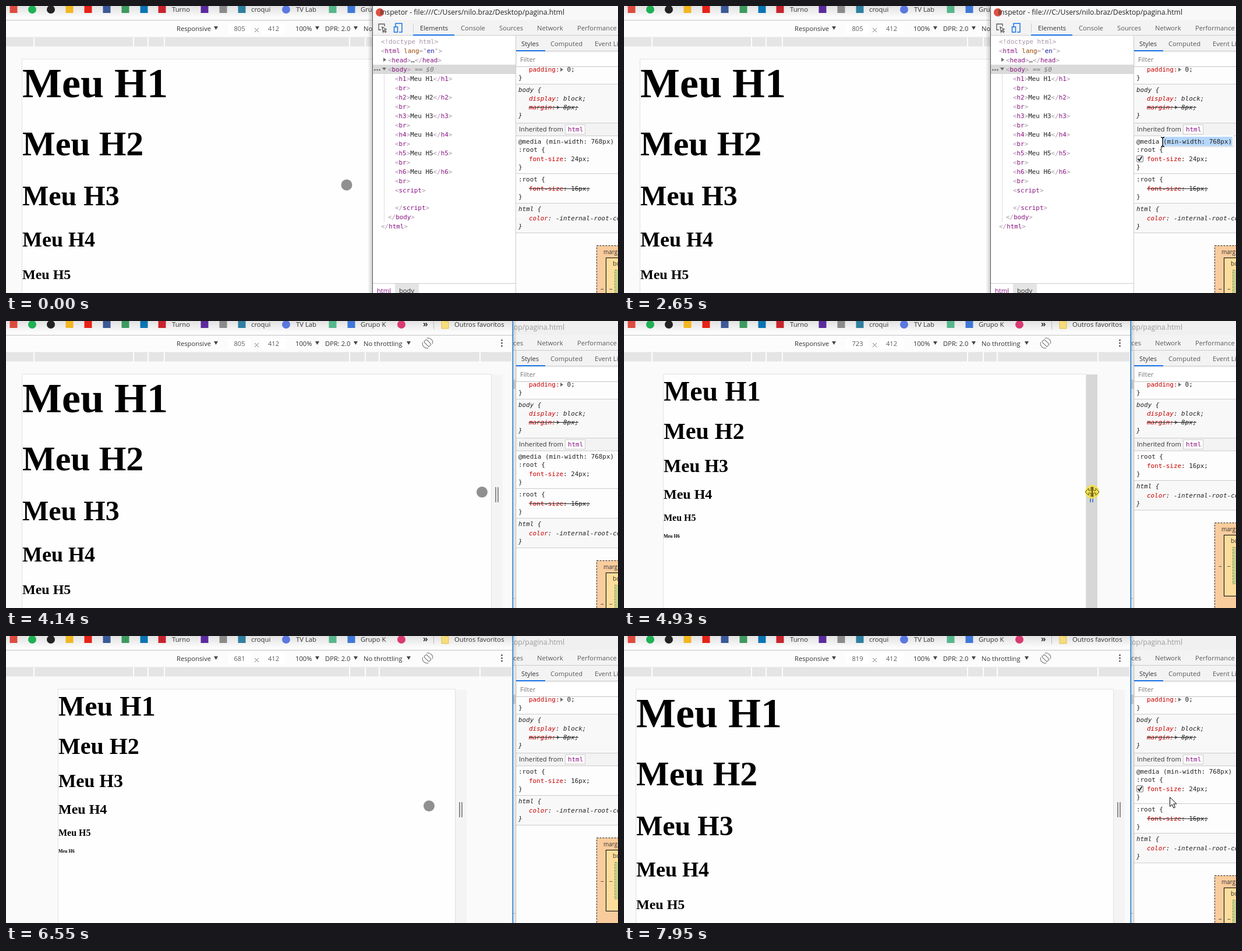
Recreate the animation shown at these times as an HTML page. Size 1051x494 px, loop 8 s.

```html
<!DOCTYPE html>
<html lang="pt">
<head>
<meta charset="utf-8">
<style>
html, body { margin: 0; width: 100%; height: 100%; overflow: hidden; background: #fff; }
svg { display: block; width: 100%; height: 100%; }
text { font: 11.2px "Open Sans", sans-serif; fill: #333; white-space: pre; }
.code { font: 10.9px "DejaVu Sans Mono", monospace; fill: #222; }
.head { font-family: "Liberation Serif", serif; font-weight: bold; fill: #000; }
.it { font-style: italic; }
.soft { fill: #5a5a5a; }
.tag { fill: #881280; }
.br { fill: #a894a6; }
.prop { fill: #c80000; }
</style>
</head>
<body>
<svg id="stage" viewBox="0 0 1051 494" xmlns="http://www.w3.org/2000/svg"></svg>
<script>
const LOOP = 8000;
const stage = document.getElementById('stage');
const $ = id => document.getElementById(id);

// ---- markup helpers ----
const rect = (x, y, w, h, fill, more = '') =>
  `<rect x="${x}" y="${y}" width="${w}" height="${h}" fill="${fill}" ${more}/>`;
const text = (x, y, s, cls = '', more = '') =>
  `<text x="${x}" y="${y}" class="${cls}" ${more}>${s}</text>`;
const code = (x, y, s, cls = '') => text(x, y, s, 'code ' + cls);
const span = (cls, s) => `<tspan class="${cls}">${s}</tspan>`;
const tag = (name, extra = '') =>
  span('br', '&lt;' + (name[0] === '/' ? '/' : '')) + span('tag', name.replace('/', '')) + extra + span('br', '&gt;');
const prop = (name, value) => span('prop', name) + ': ' + value + ';';
const path = (d, fill, more = '') => `<path d="${d}" fill="${fill}" ${more}/>`;
const down = (x, y) => path(`M${x} ${y}h7l-3.5 6z`, '#444');
const right = (x, y) => path(`M${x} ${y}v7l5 -3.5z`, '#6e6e6e');
const hline = (x, y, w, fill = '#ccc') => rect(x, y, w, 1, fill);
const group = (id, s) => `<g id="${id}">${s}</g>`;

// ---- browser window ----
function browser() {
  const marks = [
    [13, '#dd4b3e', 0], [45, '#1fb055', 1], [77, '#222', 1], [109, '#f2b61f', 0], [141, '#e62117', 0],
    [173, '#3b5998', 0], [205, '#3c9a5f', 0], [237, '#0a74b3', 0], [268, '#c8232c', 0], [341, '#5b2a9d', 0],
    [373, '#8a8a8a', 0], [405, '#2f7f9f', 0], [481, '#5b78e0', 1], [561, '#56b68b', 0], [593, '#3f78d8', 0],
    [679, '#d93a72', 1]
  ];
  const icons = marks.map(([x, c, round]) => round
    ? `<circle cx="${x}" cy="6" r="7" fill="${c}"/>`
    : rect(x - 6.5, -1, 13, 13, c)).join('');
  const names = [[285, 'Turno'], [421, 'croqui'], [498, 'TV Lab'], [609, 'Grupo K'], [770, 'Outros favoritos']]
    .map(([x, s]) => text(x, 10, s, '', 'style="font-size:11.3px"')).join('');
  const gaps = [47, 218, 243, 271, 589, 616, 640, 813].map(x => rect(x, 54, 2, 16, '#fdfdfd')).join('');
  return rect(870, 0, 8, 494, 'url(#cast)') +
    rect(0, 0, 870, 494, '#fafafa') + rect(0, 0, 870, 24, 'url(#bar)') + icons + names +
    text(716, 10, '»', '', 'style="font-size:14px;font-weight:bold"') + rect(734, 0, 1, 14, '#bbb') +
    path('M748 -1h5l1 2h6v12h-12z', '#f7dc7a', 'stroke="#e0bd50"') +
    hline(0, 24, 870, '#c4c4c4') + rect(0, 25, 870, 28, '#fcfcfc') +
    rect(381, 30, 40, 18, '#fff') + rect(439, 30, 41, 18, '#fff') +
    text(293, 43, 'Responsive') + down(357, 35) +
    text(401, 43, '805', 'soft', 'id="size" text-anchor="middle"') +
    path('M427 38l7 7m0 -7l-7 7', 'none', 'stroke="#777"') + text(459.5, 43, '412', 'soft', 'text-anchor="middle"') +
    text(497, 43, '100%') + down(531, 35) + text(548, 43, 'DPR: 2.0') + down(597, 35) +
    text(614, 43, 'No throttling') + down(688, 35) +
    `<g fill="none" stroke="#6e6e6e" transform="rotate(45 724 38)"><rect x="718" y="35" width="12" height="6" rx="1"/><path d="M717 33a8 8 0 0 1 14 0M731 43a8 8 0 0 1 -14 0"/></g>` +
    [33, 38, 43].map(y => `<circle cx="851.5" cy="${y}" r="1.5" fill="#5a5a5a"/>`).join('') +
    hline(0, 53, 870, '#eee') + rect(0, 54, 868, 15.5, '#e5e5e5') + gaps +
    group('page', rect(0, 92, 0, 402, '#fefefe', 'id="sheet" stroke="#e2e2e2"') +
      [1, 2, 3, 4, 5, 6].map(n => text(0, 0, 'Meu H' + n, 'head', `id="h${n}"`)).join('')) +
    group('handle', rect(1, 92, 19, 402, '#000', 'id="grip"') +
      group('bars', rect(7, 286, 2, 26, 'currentColor') + rect(11, 286, 2, 26, 'currentColor'))) +
    rect(869.5, 0, 1.5, 494, '#1a7fd4');
}

// ---- inspector window ----
function tree() {
  const rows = [[644, span('br', '&lt;!doctype html&gt;')],
    [644, tag('html', ' <tspan fill="#994500">lang</tspan>' + span('br', '="') + '<tspan fill="#1a1aa6">en</tspan>' + span('br', '"'))],
    [656, tag('head') + '…' + tag('/head')],
    [656, tag('body') + '<tspan class="it" fill="#777"> == $0</tspan>']];
  for (let n = 1; n < 7; n++)
    rows.push([668, tag('h' + n) + 'Meu H' + n + tag('/h' + n)], [668, tag('br')]);
  rows.push([668, tag('script')]);
  const tail = [[668, '/script'], [656, '/body'], [644, '/html']];
  return rect(630, 101, 245, 16, '#dadada') + rect(649, 117, 1, 255, '#ddd') +
    rows.map(([x, s], i) => code(x, 65 + 16 * i, s)).join('') +
    tail.map(([x, s], i) => code(x, 351 + 16 * i, tag(s))).join('') +
    right(648, 89) + path('M646 106h7l-3.5 5z', '#6e6e6e') +
    [634, 638, 642].map(x => `<circle cx="${x - 0.5}" cy="110" r="1.2" fill="#555"/>`).join('');
}

function struck(y, s) {
  return code(898, y, s) + rect(898, y - 4, 105, 1, '#222');
}

function boxModel() {
  const dash = 'stroke="#222" stroke-dasharray="3 2"';
  return rect(1014.5, 412.5, 60, 148, '#f9cc9d', dash) + rect(1030.5, 433.5, 60, 105, '#fddd9b', 'stroke="#000"') +
    rect(1045.5, 454.5, 60, 63, '#c3d08b', 'stroke="#8a8a5a" stroke-dasharray="3 2"') +
    text(1026, 427, 'margin', '', 'style="font-size:10px"') + text(1042, 447, 'border', '', 'style="font-size:10px"') +
    text(1021, 490, '–') + text(1036, 490, '–');
}

function inspector() {
  const tabs = [[711, 'Elements'], [781, 'Console'], [847, 'Sources'], [912, 'Network'], [981, 'Performance']]
    .map(([x, s], i) => text(x, 42, s, i ? 'soft' : '')).join('');
  const rules =
    code(898, 113, span('prop', 'padding:') + '  0;') + right(952, 106) + code(880, 127, '}') + hline(876, 134, 175) +
    rect(876, 135, 175, 66, '#f8f8f8') + code(880, 148, 'body {', 'it') +
    code(898, 163, prop('display', 'block'), 'it') +
    code(898, 178, span('prop', 'margin:') + '  8px;', 'it') + right(946, 171) + rect(898, 174, 85, 1, '#222') +
    code(880, 192, '}', 'it') + hline(876, 201, 175) + rect(876, 202, 175, 21, '#f3f3f3') + hline(876, 223, 175) +
    text(881, 216, 'Inherited from') + rect(960.5, 204.5, 34, 16, '#fff', 'stroke="#ccc"') + code(965, 216, 'html', 'tag');
  const wide = code(880, 237, '@media ') + 
    group('edit', rect(924, 223, 124, 20, '#000', 'opacity=".12"') + rect(923, 223, 124, 18.5, '#fff') + rect(925, 225, 120, 16, '#b5d7fb')) +
    code(926, 237, '(min-width: 768px)') + code(880, 251, ':root {') +
    code(898, 267, prop('font-size', '24px')) + code(880, 281, '}') + hline(876, 288, 175) +
    code(880, 302, ':root {') + struck(318, prop('font-size', '16px')) + code(880, 332, '}') + hline(876, 339, 175);
  const narrow = code(880, 237, ':root {') + code(898, 253, prop('font-size', '16px')) + code(880, 267, '}') + hline(876, 274, 175);
  const lower = rect(876, 340, 175, 50, '#f8f8f8') + code(880, 353, 'html {', 'it') +
    code(898, 369, prop('color', '-internal-root-color'), 'it') + code(880, 383, '}', 'it') + hline(876, 390, 175) + boxModel();
  return rect(621, 0, 8, 494, 'url(#castLeft)') + rect(629, 0, 422, 494, '#fff') +
    rect(629, 0, 422, 24, '#f8f8f8', 'id="title"') +
    '<circle cx="642" cy="11" r="7" fill="#dd5144"/>' +
    text(959, 15, 'Inspetor - file:///C:/Users/nilo.braz/Desktop/pagina.html', '', 'id="caption" text-anchor="end" style="font-size:12.2px"') +
    rect(629, 24, 422, 27, '#f3f3f3') + hline(629, 50, 422) +
    path('M650 35v-4h-10v10h4M646 36l7 4l-3 1l3 3l-1.5 1.5l-3 -3l-1 2.5z', 'none', 'stroke="#5a5a5a" stroke-width="1.3"') +
    path('M669 36v-6h11v15h-5M666.500 36h6v9h-6z', 'none', 'stroke="#1a73e8" stroke-width="1.5"') +
    rect(699, 30, 1, 16, '#ccc') + tabs + rect(699, 49, 71, 2, '#1a73e8') + tree() +
    rect(630, 478, 245, 16, '#fff') + hline(630, 477, 245) + rect(668, 478, 41, 16, '#e4e4e4') +
    text(637, 494, 'html', 'tag') + text(675, 494, 'body') +
    rect(875, 51, 1, 443, '#ccc') + rect(876, 51, 175, 27, '#f3f3f3') + hline(876, 77, 175) +
    text(885, 69, 'Styles') + text(935, 69, 'Computed', 'soft') + text(1011, 69, 'Event Listeners', 'soft') +
    rect(876, 76, 50, 2, '#1a73e8') + rect(876, 78, 175, 26, '#f3f3f3') + rect(878, 80, 173, 23, '#fff') +
    text(883, 96, 'Filter', '', 'style="fill:#757575"') + hline(876, 104, 175) + rect(876, 105, 175, 389, '#fdfdfd') + rules +
    group('wide', wide) + group('narrow', narrow) + group('lower', lower) +
    group('check', rect(880.5, 257.5, 11, 11, '#eee', 'rx="1.500" stroke="#8a8a8a"') +
      path('M882.500 263l2.500 3l4.500 -7', 'none', 'stroke="#333" stroke-width="2"')) +
    rect(629, 0, 1, 494, '#555');
}

stage.innerHTML = `<defs>
  <linearGradient id="bar" x2="0" y2="1"><stop stop-color="#e2e2e2"/><stop offset=".8" stop-color="#fbfbfb"/></linearGradient>
  <linearGradient id="cast"><stop stop-opacity=".18"/><stop offset="1" stop-opacity="0"/></linearGradient>
  <linearGradient id="castLeft"><stop stop-opacity="0"/><stop offset="1" stop-opacity=".18"/></linearGradient></defs>` +
  group('dev', inspector()) + group('web', browser()) + group('cursor',
    '<circle id="press" r="12" fill="#f4e04d" opacity=".9"/>' +
    '<circle id="dot" r="9.500" fill="#909090"/>' +
    path('M0 0v16l3.800 -3.500l2.500 6l2.600 -1.100l-2.500 -5.900h5z', '#fff', 'id="arrow" stroke="#000"') +
    path('M-3 -8q3 0 3 2q0 -2 3 -2M0 -6v12M-3 8q3 0 3 -2q0 2 3 2', 'none', 'id="beam" stroke="#000" stroke-width="1.300"') +
    path('M-12 0l6 -6v4h4v-6h1.500v16h-1.500v-6h-4v4zM12 0l-6 -6v4h-4v-6h-1.500v16h1.500v-6h4v4z', '#f4e04d', 'id="resize" stroke="#4a4310" stroke-width=".9"'));

// ---- timeline ----
const bursts = [[70, 300, 4], [530, 1310, 11], [1400, 2020, 9], [2190, 2970, 11], [3050, 3500, 7], [3670, 4290, 9],
  [4460, 5240, 11], [5320, 6090, 11], [6170, 6400, 4], [6550, 6850, 5], [7020, 7020, 1], [7170, 7950, 11]];
const trail = [[0, 585, 308], [147, 546, 322], [500, 546, 322], [530, 535, 320], [608, 414, 257], [686, 320, 226],
  [764, 191, 185], [842, 283, 188], [920, 302, 140], [998, 340, 127], [1076, 410, 153], [1232, 655, 207],
  [1310, 746, 236.500], [1600, 880, 246], [2020, 1019, 238], [2190, 1019, 238], [2658, 925, 234], [2970, 889, 262],
  [3050, 855, 266], [3500, 585, 286], [3670, 554, 288], [3750, 554, 288], [4135, 817.500, 294.500], [4290, 843, 298],
  [4460, 845, 298], [4928, 804, 294], [5320, 783, 298], [5475, 781, 298], [6090, 971, 254], [6400, 708, 284],
  [6550, 726.500, 292.500], [6850, 781, 300], [7170, 781, 301], [7560, 850, 300], [7638, 850, 298], [7950, 937.500, 277.500]];
const widths = [[0, 805], [4460, 805], [4928, 723], [5240, 686], [5320, 681], [7170, 681], [7560, 819]];
const drags = [[4460, 5395], [7020, 7635]];
const presses = [[147, 300], [2190, 2340], [3670, 3820], ...drags];
const within = (t, list) => list.some(([a, b]) => t >= a && t < b);

function stepTime(t) {
  let q = 0;
  for (const [a, b, n] of bursts) {
    if (t < a) break;
    const d = (b - a) / (n - 1) || 1;
    q = a + Math.min(n - 1, Math.floor((t - a) / d + 0.12)) * d;
  }
  return q;
}

function at(keys, t, col) {
  const i = keys.findIndex(k => k[0] > t);
  if (i < 0) return keys[keys.length - 1][col];
  if (!i) return keys[0][col];
  const a = keys[i - 1], b = keys[i];
  return a[col] + (b[col] - a[col]) * (t - a[0]) / (b[0] - a[0]);
}

const show = (id, on) => $(id).style.display = on ? '' : 'none';
const move = (id, x, y) => $(id).setAttribute('transform', `translate(${x} ${y})`);
const set = (id, attrs) => { for (const k in attrs) $(id).setAttribute(k, attrs[k]); };

const sizes = [48, 40, 32, 24, 16, 8];
const bases = { big: [157, 257, 343, 414, 470, 517], small: [137, 202.5, 259.5, 306, 344, 373] };
let front = 'web';

function draw(t) {
  const q = stepTime(t);
  const x = at(trail, q, 1), y = at(trail, q, 2);
  const w = Math.round(at(widths, q - 12, 1));
  const left = Math.floor(430.5 - w / 2), edge = left + w;
  const big = w >= 768, drag = within(q, drags);

  const next = (q >= 225 && q < 2260) || q >= 3740 ? 'web' : 'dev';
  if (next !== front) stage.insertBefore($(front = next), $('cursor'));
  const active = front === 'dev';
  set('title', { fill: active ? '#f8f8f8' : '#f0f0f0' });
  $('caption').style.fill = active ? '#222' : '#999';

  $('size').textContent = Math.round(at(widths, q, 1));
  move('page', left, 0);
  set('sheet', { x: -0.5, y: 91.5, width: w + 1, height: 410 });
  sizes.forEach((s, i) => {
    const h = $('h' + (i + 1));
    h.style.fontSize = s * (big ? 1.5 : 1) + 'px';
    h.setAttribute('y', bases[big ? 'big' : 'small'][i]);
  });

  const grip = !active && (drag || (x >= edge && x < edge + 21));
  move('handle', edge, 0);
  set('grip', { 'fill-opacity': drag ? 0.14 : grip ? 0.08 : 0.025 });
  $('bars').style.color = drag ? '#4a86c8' : '#8c8c8c';

  show('wide', big);
  show('narrow', !big);
  show('edit', q >= 2340 && q < 3740);
  move('lower', 0, big ? 0 : -65);
  show('check', !drag && x > 876 && y > 223 && y < (big ? 288 : 274));
  move('check', 0, big ? 0 : -14);

  const overPage = x < (active ? 629 : edge) && !drag;
  const beam = active && q >= 2340 && x > 920 && y < 243;
  move('cursor', x, y);
  show('press', within(q, presses));
  show('dot', overPage);
  show('resize', grip);
  show('beam', beam);
  show('arrow', !overPage && !grip && !beam);
}

const start = performance.now();
function tick(now) {
  draw(Math.max(0, now - start) % LOOP);
  requestAnimationFrame(tick);
}
draw(0);
requestAnimationFrame(tick);
</script>
</body>
</html>
```
